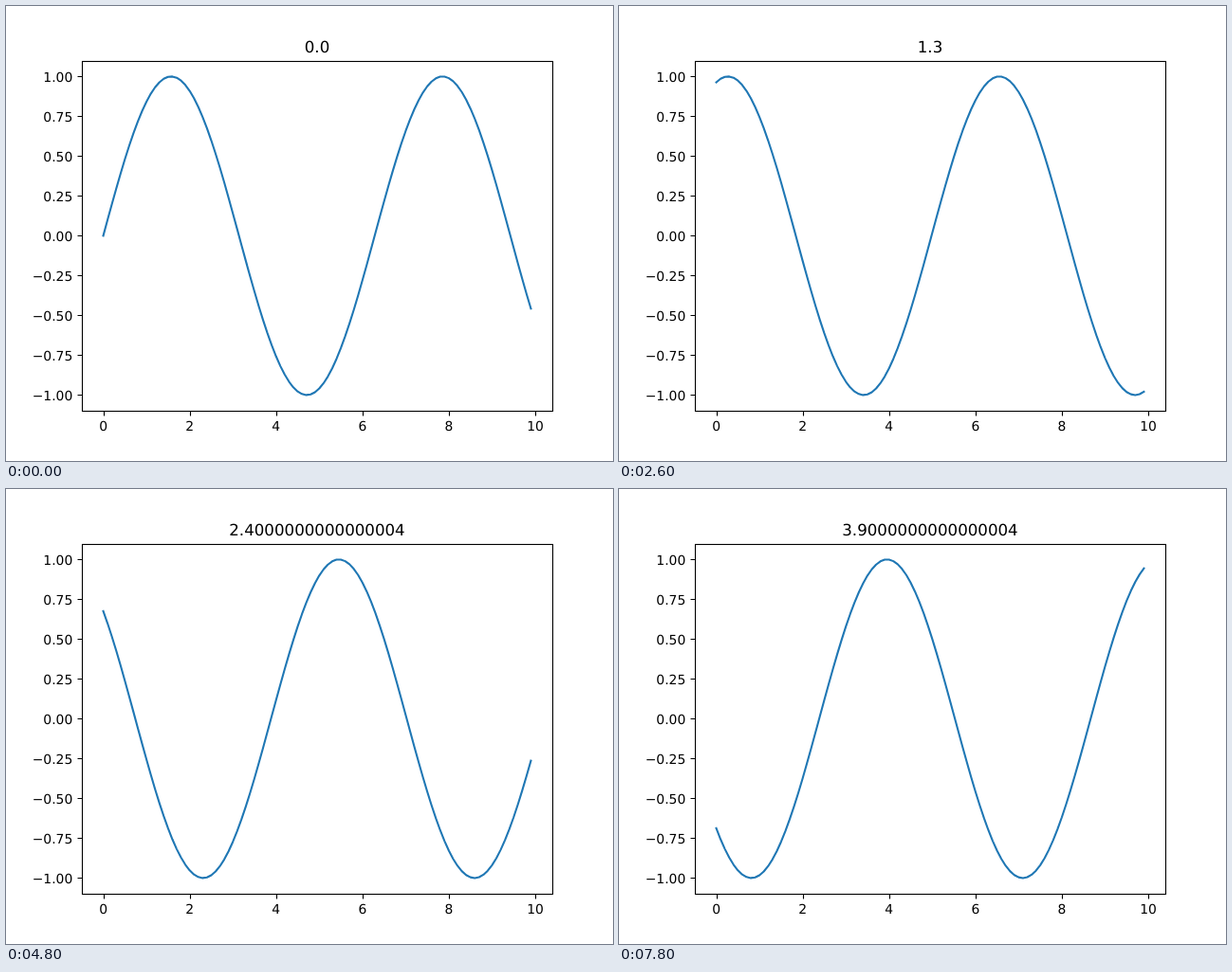
These frames come from a looping animation (640 px wide and 480 px high, 8 s). An HTML page:

```html
<!DOCTYPE html>
<html lang="en">
<head>
<meta charset="utf-8">
<title>Sine wave</title>
<style>
  html, body { margin: 0; width: 100%; height: 100%; overflow: hidden; background: #fff; }
  svg { display: block; width: 640px; height: 480px; }
  text { font: 13.889px "DejaVu Sans", sans-serif; text-rendering: geometricPrecision; }
  #title { font-size: 16.667px; }
  .frame { fill: none; stroke: #000; stroke-width: 1.11; }
  #wave { fill: none; stroke: #1f77b4; stroke-width: 2.083; stroke-linejoin: round; stroke-linecap: square; }
</style>
</head>
<body>
<svg viewBox="0 0 640 480">
  <path id="ticks" class="frame"/>
  <path id="wave"/>
  <rect class="frame" x="80.5" y="58.5" width="496" height="369"/>
  <g id="labels"></g>
  <text id="title" x="328" y="49" text-anchor="middle"></text>
</svg>
<script>
const STEP_MS = 200, STEPS = 40, SAMPLES = 100;
const byId = id => document.getElementById(id);
const wave = byId('wave'), title = byId('title');

const toX = x => 102.545 + x * 45.546;
const toY = y => 242.37 - y * 168.04;

function addLabel(text, x, y, anchor) {
  const label = document.createElementNS('http://www.w3.org/2000/svg', 'text');
  label.setAttribute('x', x);
  label.setAttribute('y', y);
  label.setAttribute('text-anchor', anchor);
  label.textContent = text;
  byId('labels').append(label);
}

function drawAxes() {
  let d = '';
  for (let x = 0; x <= 10; x += 2) {
    d += `M${Math.round(toX(x)) + 0.5} 427.5v5`;
    addLabel(x, toX(x), 448, 'middle');
  }
  for (let y = -1; y <= 1; y += 0.25) {
    const row = Math.round(toY(y));
    d += `M80.5 ${row + 0.5}h-5`;
    addLabel(y.toFixed(2).replace('-', '\u2212'), 70.28, row + 6, 'end');
  }
  byId('ticks').setAttribute('d', d);
}

function drawWave(phase) {
  const points = Array.from({ length: SAMPLES }, (_, i) => {
    const x = i * 0.1;
    return `${toX(x).toFixed(2)} ${toY(Math.sin(x + phase)).toFixed(2)}`;
  });
  wave.setAttribute('d', 'M' + points.join('L'));
  // The title shows the raw floating-point value
  title.textContent = Number.isInteger(phase) ? phase.toFixed(1) : String(phase);
}

let start, shown = -1;
function tick(now) {
  start ??= now;
  const step = Math.floor((now - start) / STEP_MS) % STEPS;
  if (step !== shown) {
    shown = step;
    drawWave(step * 0.1);
  }
  requestAnimationFrame(tick);
}

drawAxes();
drawWave(0);
requestAnimationFrame(tick);
</script>
</body>
</html>
```
